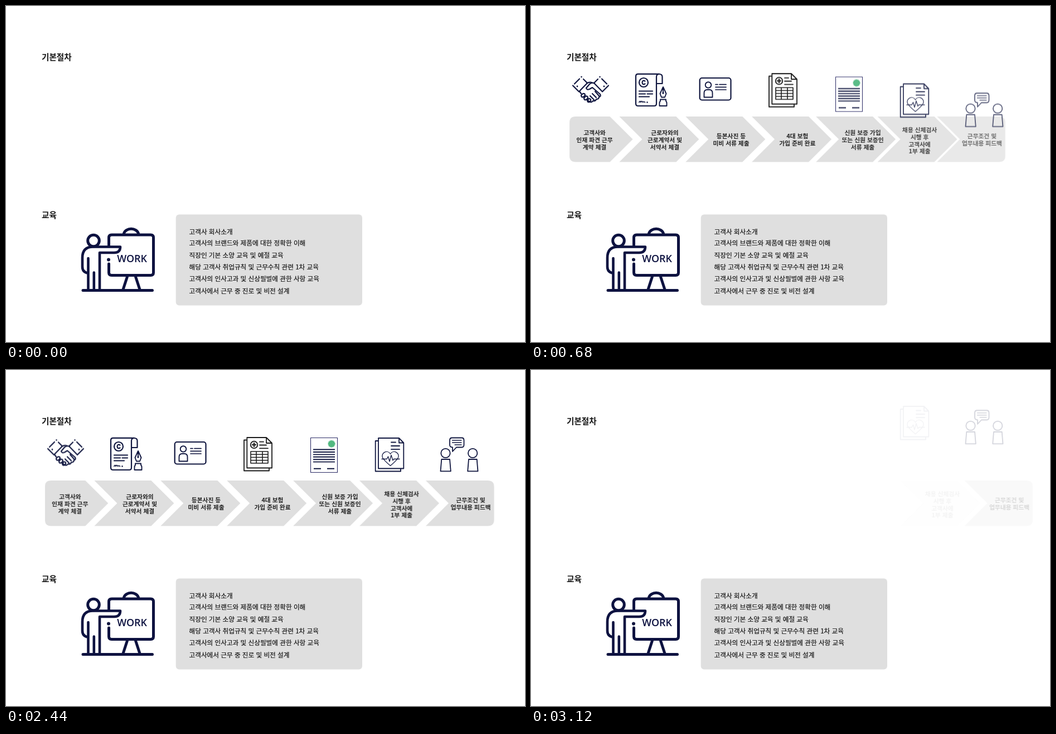
An HTML page that plays this animation: 931x602 px, repeating every 3.16 s.

```html
<!DOCTYPE html>
<html lang="ko">
<head>
<meta charset="utf-8">
<title>기본절차</title>
<style>
html, body { margin: 0; width: 100%; height: 100%; overflow: hidden; background: #fff; }
svg { display: block; width: 100vw; height: 100vh; }
text { font-family: "Noto Sans CJK KR", "Noto Sans CJK", "Noto Sans KR", sans-serif; fill: #151515; }
.head { font-size: 14.6px; font-weight: 700; }
.list { font-size: 11.64px; font-weight: 500; stroke: #151515; stroke-width: .2; }
.label { font-size: 10.72px; font-weight: 700; text-anchor: middle; fill: #222; }
.work { font: 600 17.9px "Open Sans", sans-serif; text-anchor: middle; fill: #0d1240; }
.grey { fill: #dfdfdf; }
.icon, .scene { fill: none; stroke: #10163f; stroke-width: 2.2; stroke-linecap: round; stroke-linejoin: round; }
.scene { stroke: #0d1240; stroke-width: 5; }
.dot { fill: #10163f; stroke: none; }

/* Every step runs the same cycle, 64 ms after its neighbour. */
.step, .icon { animation: slide 3160ms linear calc(64ms * var(--i) - 3186ms) infinite; }
.icon { animation-name: rise; }
@keyframes slide {
  0% { transform: translate(-74.5px, 0); opacity: 0; animation-timing-function: cubic-bezier(.37, 0, .63, 1); }
  16.772%, 76.519% { transform: none; opacity: 1; animation-timing-function: cubic-bezier(.37, 0, .63, 1); }
  91.709%, 100% { transform: translate(30px, 0); opacity: 0; }
}
@keyframes rise {
  0% { transform: translate(0, 105px); opacity: 0; animation-timing-function: cubic-bezier(.37, 0, .63, 1); }
  16.772%, 76.519% { transform: none; opacity: 1; animation-timing-function: cubic-bezier(.37, 0, .63, 1); }
  91.709%, 100% { transform: translate(0, -60px); opacity: 0; }
}
/* Blank start of the loop: cuts off the last step's exit. */
.flow { animation: cut 3160ms step-end infinite; }
@keyframes cut { 0% { opacity: 0; } 2.532%, 100% { opacity: 1; } }
</style>
</head>
<body>
<svg viewBox="0 0 931 602">
  <g class="flow">
    <g id="steps"></g>

    <!-- handshake -->
    <g class="icon" style="--i:0">
      <path d="M75 142.500L86 153.500L101 138L94 131M78 139.500L87 130.500"/>
      <path d="M139 142.500L128 153.500L113 138L120 131M136 139.500L127 130.500"/>
      <path d="M100 138.500Q104 136 109 137M114 138.500Q109 136 105 140L99 147Q100 151 105 149L110 146L124 158Q126 162 122 163Q122 167 117 167Q116 171 111 170Q109 173 106 172L103 170"/>
      <path d="M110 157L117 164M106 161L113 168M115 153L122 161M87 153L90 157"/>
      <path d="M90 160L93 157Q97 156 97 160L94 163Q90 164 90 160ZM95 165L98 161.500Q102 161 102 165L99 168Q95 169 95 165ZM101 169L104 166Q108 166 107 170L105 172Q101 173 101 169Z"/>
      <g class="dot"><circle cx="90.500" cy="127" r="1.300"/><circle cx="123.500" cy="127" r="1.300"/><circle cx="83" cy="144" r="1.400"/><circle cx="131" cy="144" r="1.400"/></g>
    </g>

    <!-- contract and pen -->
    <g class="icon" style="--i:1">
      <path d="M230 121.800H192Q188 121.800 188 126V175Q188 179 192 179H221Q225 179 225 175V127Q225 122 230 122Q235.500 122 235.500 127V139H225.500"/>
      <circle cx="202" cy="137" r="8"/>
      <path d="M204.500 134.500Q200 132 199.500 137Q200 142 204.500 139.500"/>
      <path d="M194 152.500H218M194 157.500H205M208.500 157.500H218M194 162.500H212"/>
      <path d="M194 172.500q2-4 3 0q2-4 3.500 0q1.500-2 4 0" stroke-width="1.700"/>
      <circle class="dot" cx="208.500" cy="172.500" r="1.300"/>
      <path d="M237 145L231.500 157L234 163.500H240L242.500 157ZM237 146V155M232 167.500H242V170L243.500 173V179H230.500V173L232 170Z" stroke-width="1.900"/>
      <circle class="dot" cx="237" cy="156" r="1.700"/>
    </g>

    <!-- identity card -->
    <g class="icon" style="--i:2">
      <rect x="302.700" y="129" width="55.800" height="39.500" rx="4"/>
      <circle cx="318" cy="141.500" r="5.300" stroke-width="1.900"/>
      <path d="M310.500 163.500V156Q310.500 150 316 150H320Q325.500 150 325.500 156V163.500Z" stroke-width="1.900"/>
      <path d="M331 140.700H335M338 140.700H350M331 145.300H350M331 150H350" stroke-width="1.700"/>
    </g>

    <!-- insurance form -->
    <g class="icon" style="--i:3; stroke:#1b1b1b; stroke-width:1.800">
      <path d="M431 125.500H427V180.500H472V176"/>
      <path d="M467 121H432.300V175.500H477V131ZV131H477"/>
      <circle cx="445" cy="134" r="6.300"/>
      <path d="M445 130.800V137.200M441.800 134H448.200" stroke-width="2.200"/>
      <path d="M455 128.700H462M455 134.500H467M455 140.300H470"/>
      <path d="M439 146H470V167H439ZM439 151.300H470M439 156.500H470M439 161.800H470M449 146V167M460 146V167" stroke-width="1.600"/>
    </g>

    <!-- guarantee -->
    <g class="icon" style="--i:4; stroke-width:1.900; stroke-linecap:butt">
      <rect x="546.500" y="121.500" width="48" height="62" stroke="#2c2c66" stroke-width="1.100"/>
      <circle cx="584" cy="132.300" r="5.600" fill="#52b981" stroke="#52b981" stroke-dasharray="1.800 .7"/>
      <path d="M551 142.500H590M551 147H590M551 151.400H590M551 155.800H590M551 160.200H590M551 164.600H590M552 176.800H565M576 176.800H589"/>
    </g>

    <!-- health check -->
    <g class="icon" style="--i:5; stroke-width:1.800">
      <path d="M667 127H662.700V181.500H708V177"/>
      <path d="M705 122H668V176.500H713.300V130.500ZV130.500H713.300"/>
      <path d="M691 129.500H699M691 136H706M691 142.200H706"/>
      <path d="M675.500 157C672 149 684 141.500 689.500 150.500C695 141.500 707 149 703.500 157Q701 162 689.500 171.500Q678 162 675.500 157Z" stroke-width="1.300"/>
      <path d="M674 159.500H683L685.500 155L688 164L691 152.500L694 162L695.500 159.500H706" stroke-width="1.300"/>
    </g>

    <!-- feedback -->
    <g class="icon" style="--i:6; stroke-width:1.800">
      <path d="M800 121.500H817.500Q821.500 121.500 821.500 126V134Q821.500 138.500 817.500 138.500H808L801 146V138.500Q796 138.500 796 134V126Q796 121.500 800 121.500Z"/>
      <path d="M800.500 126H817M800.500 130H817M805 134H817" stroke-width="1.300"/>
      <circle cx="788.500" cy="149" r="8.200"/>
      <path d="M781.300 160H796L797.800 181.300H779.500Z"/>
      <circle cx="837.200" cy="149" r="8.200"/>
      <path d="M830 160H844.700L846.500 181.300H828.200Z"/>
    </g>
  </g>

  <text class="head" x="64" y="97">기본절차</text>
  <text class="head" x="64" y="379.500">교육</text>

  <!-- trainer at the board -->
  <g class="scene">
    <circle cx="157" cy="420.500" r="10.300"/>
    <path d="M184.500 429V415Q184.500 410 189.500 410H259.500Q264.500 410 264.500 415V477.500Q264.500 482.500 259.500 482.500H189.500Q184.500 482.500 184.500 477.500V462"/>
    <path d="M211.500 407.500A13.300 10.500 0 0 1 237.500 407.500"/>
    <path d="M147 478.500Q137 477 137 467V451Q137 431.500 156 431.500H205Q205 442 194 442H168V508M147.500 452V508M157.800 477.500V508" stroke-width="4.600"/>
    <path d="M217.500 485L210 508M232.500 485L240 508M138 509.500H262.500"/>
    <circle class="dot" cx="184" cy="454.500" r="3"/>
  </g>
  <text class="work" x="226" y="458.500">WORK</text>

  <rect class="grey" x="304.700" y="373.500" width="334.300" height="163" rx="6"/>
  <g class="list">
    <text x="328.500" y="408.600">고객사 회사소개</text>
    <text x="328.500" y="428.600">고객사의 브랜드와 제품에 대한 정확한 이해</text>
    <text x="328.500" y="450.600">직장인 기본 소양 교육 및 예절 교육</text>
    <text x="328.500" y="472.400">해당 고객사 취업규칙 및 근무수칙 관련 1차 교육</text>
    <text x="328.500" y="493">고객사의 인사고과 및 신상필벌에 관한 사항 교육</text>
    <text x="328.500" y="515">고객사에서 근무 중 진로 및 비전 설계</text>
  </g>
</svg>
<script>
const steps = [
  [114, '고객사와', '인재 파견 근무', '계약 체결'],
  [240, '근로자와의', '근로계약서 및', '서약서 체결'],
  [359, '등본사진 등', '미비 서류 제출'],
  [478, '4대 보험', '가입 준비 완료'],
  [599, '신원 보증 가입', '또는 신원 보증인', '서류 제출'],
  [709.5, '채용 신체검사', '시행 후', '고객사에', '1부 제출'],
  [833.5, '근무조건 및', '업무내용 피드백']
];
const high = 198, mid = 238.7, low = 279.4, pitch = 118.9, lead = 12.8;

function arrow(i) {
  const x = 39.5 + pitch * i;
  const left = i ? `M${x} ${low}L${x + 41} ${mid}L${x} ${high}`
                 : `M80 ${low}Q69 ${low} 69 ${low - 11}V${high + 11}Q69 ${high} 80 ${high}`;
  const right = i < 6 ? `H${x + 102}L${x + 143} ${mid}L${x + 102} ${low}Z`
                      : `H864Q875.500 ${high} 875.500 ${high + 11}V${low - 11}Q875.500 ${low} 864 ${low}Z`;
  return `<path class="grey" d="${left}${right}"/>`;
}

function label([x, ...lines]) {
  const first = (lines.length > 3 ? 245.2 : 243.7) - (lines.length - 1) * lead / 2;
  return lines.map((s, k) => `<text class="label" x="${x}" y="${first + k * lead}">${s}</text>`).join('');
}

document.getElementById('steps').innerHTML = steps.map((step, i) =>
  `<g class="step" style="--i:${i}">${arrow(i)}${label(step)}</g>`).join('');
</script>
</body>
</html>
```
